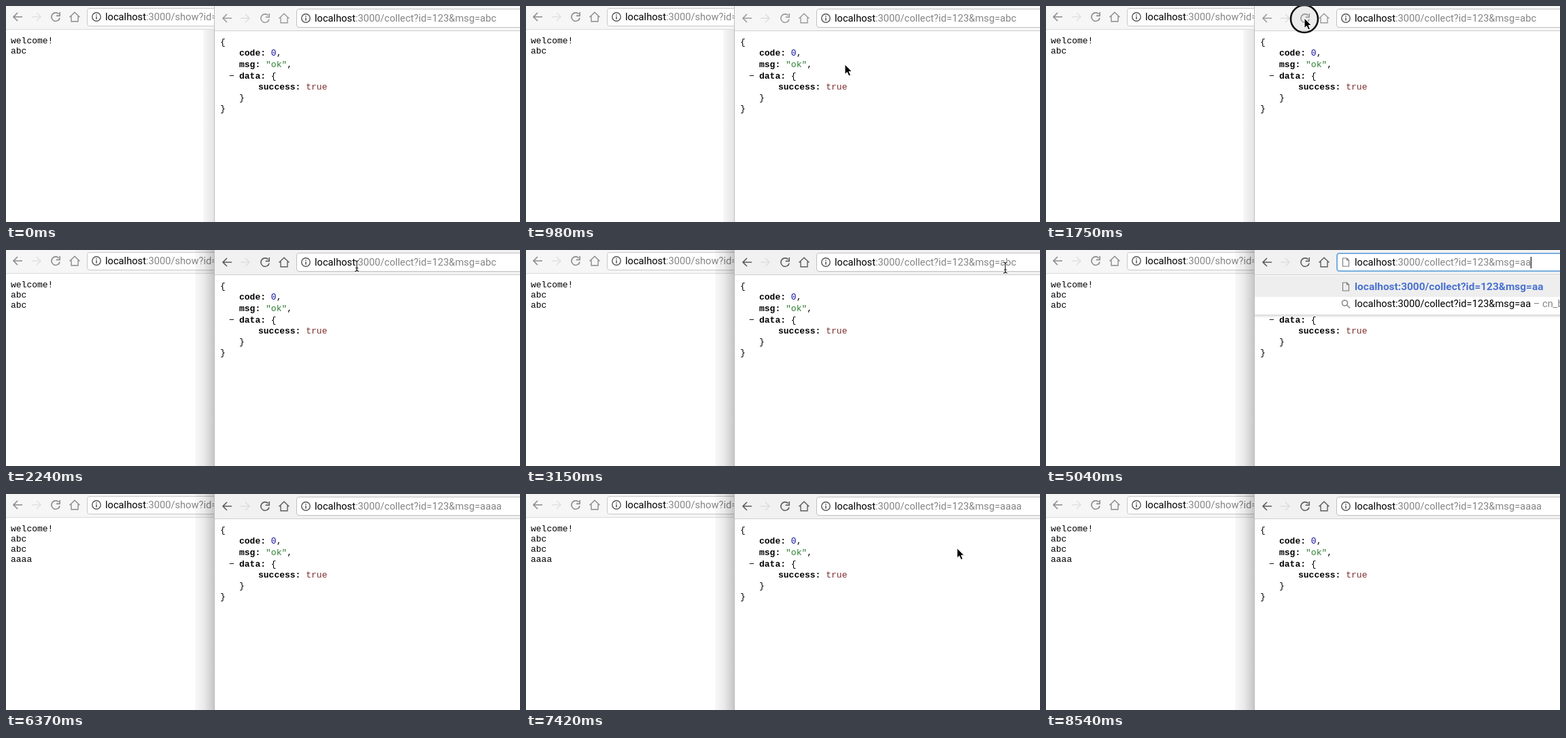
These frames come from a looping animation (756x318 px, 8.61 s). An HTML page:

```html
<!DOCTYPE html>
<html lang="en">
<head>
<meta charset="utf-8">
<title>Collect and show</title>
<style>
  html, body { margin: 0; width: 100%; height: 100%; overflow: hidden; background: #fff; }
  svg { display: block; width: 756px; height: 318px; }
  text { white-space: pre; }
  .url { font: 14.66px Roboto, sans-serif; fill: #858585; }
  .host { fill: #000; }
  .mono { font: 13px "Liberation Mono", "Courier New", monospace; fill: #000; }
  .key { font-weight: bold; }
  .icon { fill: none; stroke-width: 1.6; }
  .best { font-size: 15.45px; font-weight: bold; fill: #4a72d0; }
</style>
</head>
<body>
<svg viewBox="0 0 756 318">
  <defs>
    <linearGradient id="shade">
      <stop offset="0" stop-color="#000" stop-opacity=".025"/>
      <stop offset=".45" stop-color="#000" stop-opacity=".08"/>
      <stop offset="1" stop-color="#000" stop-opacity=".23"/>
    </linearGradient>
    <linearGradient id="paleShade">
      <stop offset="0" stop-color="#000" stop-opacity=".03"/>
      <stop offset="1" stop-color="#000" stop-opacity=".11"/>
    </linearGradient>
    <linearGradient id="drop" x2="0" y2="1">
      <stop offset="0" stop-color="#000" stop-opacity=".16"/>
      <stop offset="1" stop-color="#000" stop-opacity="0"/>
    </linearGradient>
    <g id="arrow" class="icon"><path d="M7 0H-6M0-6L-6 0L0 6"/></g>
    <g id="reload" class="icon"><path d="M4.6-4.2A6.2 6.2 0 1 0 6.1 1.5M6.2-7V-1.6H.8"/></g>
    <g id="home" class="icon"><path d="M-7.5 .5L0-6.8L7.5 .5M-5-1V6.8H5V-1" stroke-width="1.4"/></g>
    <g id="info" class="icon" stroke="#555"><circle r="6.2" stroke-width="1.4"/><path d="M0-.8V3.6M0-3.6V-2"/></g>
    <g id="doc" class="icon" stroke="#777"><path d="M-4.5-6H1.5L4.5-3V6H-4.5ZM1.5-6V-3H4.5" stroke-width="1.1"/></g>
  </defs>

  <rect width="756" height="318" fill="#fff"/>
  <rect width="307" height="34" fill="#f6f6f6"/>
  <path d="M0 34.5H307" stroke="#dcdcdc"/>
  <rect x="119.5" y="3.5" width="220" height="26" rx="3.5" fill="#fff" stroke="#c8c8c8"/>
  <g stroke="#8b8b8b">
    <use href="#arrow" x="17" y="16"/>
    <use href="#arrow" transform="translate(45 16) scale(-1 1)" stroke="#e2e2e2"/>
    <use href="#reload" x="73" y="16"/>
    <use href="#home" x="101" y="16"/>
  </g>
  <use href="#info" x="133" y="16"/>
  <text class="url" x="146" y="21"><tspan class="host">localhost</tspan>:3000/show?id=</text>
  <g id="log"></g>
  <rect id="softShade" x="290" y="35" width="17" height="283" fill="url(#paleShade)"/>
  <rect id="deepShade" x="278" width="29" height="318" fill="url(#shade)"/>

  <rect x="307" width="449" height="318" fill="#fff"/>
  <rect id="bar" x="307" width="449" height="36"/>
  <path d="M307 36.5H756" stroke="#cfcfcf"/>
  <path d="M306.5 0V318" stroke="#bdbdbd"/>
  <g id="tools">
    <use href="#arrow" x="325" y="18"/>
    <use href="#arrow" transform="translate(352 18) scale(-1 1)" stroke="#dedede"/>
    <use href="#reload" x="381" y="18"/>
    <use href="#home" x="409" y="18"/>
  </g>
  <rect id="field" width="345" rx="3.5" fill="#fff"/>
  <rect id="selection" x="697" y="9" height="19" fill="#a9d0f5"/>
  <use id="pageInfo" href="#info" x="441" y="18"/>
  <use id="pageDoc" href="#doc" x="441" y="18"/>
  <text class="url" x="454" y="23"><tspan class="host">localhost</tspan>:3000/collect?id=123&amp;msg=<tspan id="msg"></tspan></text>
  <path id="caret" stroke="#111" stroke-width="1.2"/>

  <g id="json" class="mono">
    <text x="315" y="57">{</text>
    <text x="343" y="73"><tspan class="key">code:</tspan> <tspan fill="#1414a0">0</tspan>,</text>
    <text x="343" y="90"><tspan class="key">msg:</tspan> <tspan fill="#2f7d32">"ok"</tspan>,</text>
    <text x="328" y="107">−</text>
    <text x="343" y="107"><tspan class="key">data:</tspan> {</text>
    <text x="371" y="123"><tspan class="key">success:</tspan> <tspan fill="#7c2c2c">true</tspan></text>
    <text x="343" y="139">}</text>
    <text x="315" y="155">}</text>
  </g>

  <g id="suggest">
    <rect x="307" y="37" width="449" height="58" fill="#fff"/>
    <rect x="307" y="38" width="449" height="31" fill="#eee"/>
    <rect x="307" y="95" width="449" height="5" fill="url(#drop)"/>
    <use href="#doc" x="441" y="54"/>
    <g class="icon" stroke="#888"><circle cx="439.5" cy="78" r="4"/><path d="M442.5 81L447 85.5"/></g>
    <text class="url best" x="454" y="59"></text>
    <text class="url" x="454" y="84"><tspan class="host" id="query"></tspan> – cn_bnd</text>
  </g>

  <g id="pointer">
    <circle id="ring" r="20" fill="#000" fill-opacity=".04" stroke="#111" stroke-width="2.6"/>
    <path id="hand" d="M0-1V13.5L3.4 10.6L5.8 16L8.5 14.8L6.1 9.6H10.5Z" fill="#000" stroke="#fff"/>
    <g id="beam" fill="none">
      <path d="M-3-8Q0-8 0-5Q0-8 3-8M0-5V5M-3 8Q0 8 0 5Q0 8 3 8M-2 3H2" stroke="#fff" stroke-width="3"/>
      <path d="M-3-8Q0-8 0-5Q0-8 3-8M0-5V5M-3 8Q0 8 0 5Q0 8 3 8M-2 3H2" stroke="#222" stroke-width="1.2"/>
    </g>
  </g>
</svg>
<script>
const LOOP = 8610, STEP = 70;
const URL_TEXT = "localhost:3000/collect?id=123&msg=";
const $ = id => document.getElementById(id);
const best = document.querySelector(".best");

// Each trip: [ms, x, y]; the pointer is hidden between trips.
const trips = [
  [[490, 672, 152], [630, 600, 140], [770, 508, 114], [1190, 430, 60], [1540, 380, 19],
   [1960, 380, 19], [2520, 652, 28], [3150, 705, 26], [3290, 705, 26], [3430, 697, 25],
   [3500, 697, 24], [4060, 740, 22], [4620, 740, 22]],
  [[6650, 731, 22], [6930, 715, 26], [7070, 704, 34], [7490, 620, 90],
   [7980, 488, 200], [8330, 460, 336]]
];
const typed = [[0, "abc"], [4690, "a"], [4900, "aa"], [5110, "aaa"], [5320, "aaaa"]];
const logged = [[0, "welcome!"], [0, "abc"], [2030, "abc"], [5880, "aaaa"]];

const lines = logged.map(([at, word], i) => {
  const line = document.createElementNS("http://www.w3.org/2000/svg", "text");
  line.setAttribute("class", "mono");
  line.setAttribute("x", 7);
  line.setAttribute("y", 55 + 15 * i);
  line.textContent = word;
  $("log").append(line);
  return { at, line };
});

const show = (el, on) => { el.style.display = on ? "" : "none"; };
const set = (id, attrs) => { for (const k in attrs) $(id).setAttribute(k, attrs[k]); };
const within = (t, from, to) => t >= from && t < to;
const write = (el, s) => { if (el.textContent !== s) el.textContent = s; };

function pointerAt(t) {
  const trip = trips.find(p => within(t, p[0][0], p[p.length - 1][0]));
  if (!trip) return null;
  const i = trip.findIndex(p => p[0] > t);
  const [t0, x0, y0] = trip[i - 1], [t1, x1, y1] = trip[i];
  const k = (t - t0) / (t1 - t0);
  return { x: x0 + (x1 - x0) * k, y: y0 + (y1 - y0) * k };
}

function draw(t) {
  const active = t >= 1820;
  const focused = within(t, 3430, 5600);
  const editing = within(t, 4690, 5600);
  const word = typed.filter(([at]) => at <= t).pop()[1];
  const pos = pointerAt(t);

  lines.forEach(({ at, line }) => show(line, t >= at));
  show($("softShade"), !active);
  show($("deepShade"), active);
  set("bar", { fill: active ? "#f1f1f1" : "#f6f6f6" });
  set("tools", { stroke: active ? "#5c5c5c" : "#9a9a9a" });
  set("field", focused
    ? { x: 428, y: 5, height: 26, stroke: "#78aee0", "stroke-width": 2 }
    : { x: 427.5, y: 4.5, height: 27, stroke: "#c0c0c0", "stroke-width": 1 });

  write($("msg"), word);
  show($("pageInfo"), !editing);
  show($("pageDoc"), editing);
  show($("suggest"), editing);
  show($("caret"), editing);
  set("caret", { d: `M${697.5 + 7.97 * word.length} 10V27` });
  write(best, URL_TEXT + word);
  write($("query"), URL_TEXT + word);

  const selecting = within(t, 3500, 4690);
  const end = pos ? Math.min(pos.x, 721) : 721;
  show($("selection"), selecting);
  set("selection", { width: selecting ? Math.max(0, end - 697) : 0 });
  show($("json"), !within(t, 1960, 2030) && !within(t, 5740, 5810));

  show($("pointer"), pos);
  if (pos) {
    const overField = pos.x > 427 && pos.y < 32;
    set("pointer", { transform: `translate(${pos.x} ${pos.y})` });
    show($("hand"), !overField);
    show($("beam"), overField);
    show($("ring"), within(t, 1680, 1890) || within(t, 3430, 4270));
  }
}

const start = performance.now();
function tick() {
  const t = (performance.now() - start) % LOOP;
  draw(Math.floor(t / STEP) * STEP);
  requestAnimationFrame(tick);
}
draw(0);
requestAnimationFrame(tick);
</script>
</body>
</html>
```
